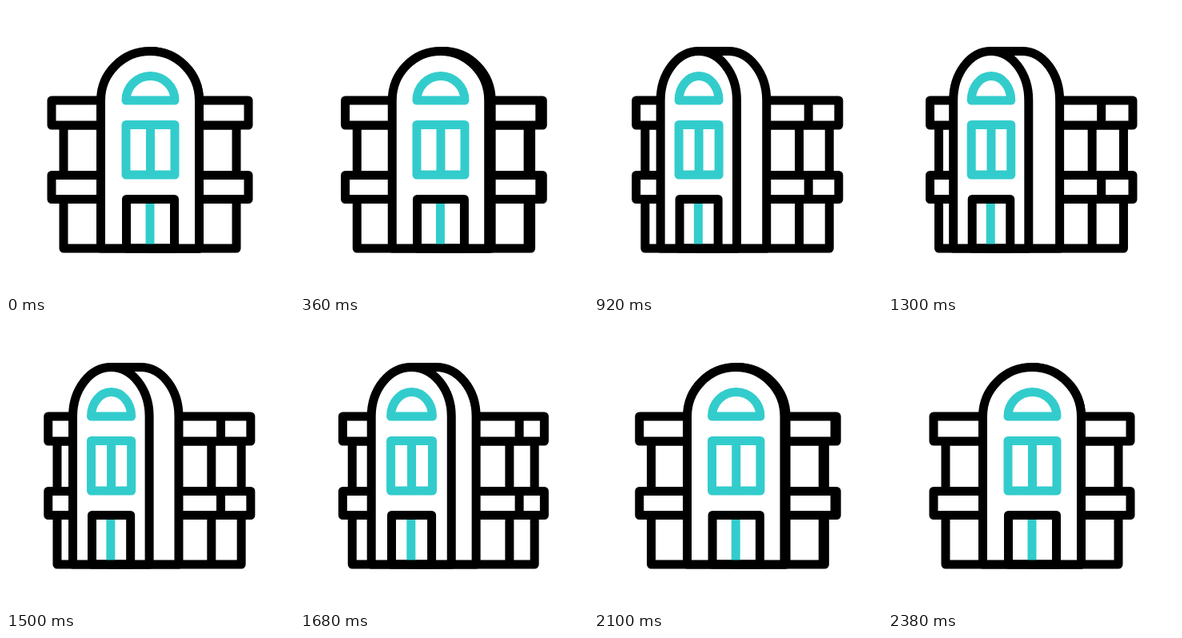
Animation of 360 by 360 pixels, one loop 2.4 s. Source, as an HTML page:

```html
<!DOCTYPE html>
<html lang="en">
<head>
<meta charset="utf-8">
<title>Turning building</title>
<style>
  html, body { margin: 0; height: 100%; overflow: hidden; background: #fff; }
  svg { display: block; width: 100vw; height: 100vh; }
  path { fill: #fff; stroke: #000; stroke-width: 11; stroke-linejoin: round; }
  .teal { stroke: #33cccc; }
</style>
</head>
<body>
<svg viewBox="0 0 360 360">
  <path id="walls"/>
  <path id="balconies"/>
  <path id="towerSide"/>
  <path id="towerFront"/>
  <path id="doorBar" class="teal"/>
  <path id="door"/>
  <path id="panes" class="teal"/>
</svg>
<script>
const LOOP = 2400;
const GROUND = 303;
const mix = (a, b, p) => a + (b - a) * p;
const draw = (id, d) => document.getElementById(id).setAttribute('d', d);
const box = (l, r, t, b) => `M${l} ${t}H${r}V${b}H${l}Z`;
const bar = (x, t, b) => `M${x} ${t}V${b}`;
const arch = (l, r, spring, top, base) =>
  `M${l} ${base}V${spring}A${(r - l) / 2} ${spring - top} 0 0 1 ${r} ${spring}V${base}Z`;

// cubic-bezier(.75, 0, .25, 1), solved by bisection
function ease(x) {
  let lo = 0, hi = 1, u = 0.5;
  for (let i = 0; i < 24; i++) {
    u = (lo + hi) / 2;
    const v = 1 - u;
    if (2.25 * u * v * v + 0.75 * u * u * v + u ** 3 < x) lo = u; else hi = u;
  }
  return u * u * (3 - 2 * u);
}

function render(time) {
  const phase = time % LOOP / (LOOP / 2);
  const p = ease(phase < 1 ? phase : 2 - phase);
  const at = (front, turned) => mix(front, turned, p);

  const wallLeft = at(72, 63.5), wallRight = at(288, 294.5);
  draw('walls', box(wallLeft, wallRight, 149, GROUND) + bar(at(288, 255), 149, GROUND));

  const balconyLeft = at(57, 52.5), balconyRight = at(303, 306);
  const balconyCorner = at(303, 266.5);
  const balcony = (t, b) => box(balconyLeft, balconyRight, t, b) + bar(balconyCorner, t, b);
  draw('balconies', balcony(118, 149) + balcony(211.5, 241.5));

  const left = at(118.5, 81.5), right = at(241.5, 175.5), backRight = at(241.5, 214.5);
  const radius = (right - left) / 2;
  draw('towerSide', `M${left + radius} 56.5H${backRight - radius}` +
    `A${radius} 61.5 0 0 1 ${backRight} 118V${GROUND}H${left + radius}Z`);
  draw('towerFront', arch(left, right, 118, 56.5, GROUND));

  const doorLeft = at(150.5, 105), doorRight = at(210.5, 152.5);
  draw('door', box(doorLeft, doorRight, 241.5, GROUND));
  document.getElementById('door').style.fill = 'none';
  draw('doorBar', bar(at(180, 128), 241.5, GROUND));

  const paneLeft = at(150, 104), paneRight = at(211, 153.5);
  draw('panes', arch(paneLeft, paneRight, 118, 87.5, 118) +
    box(paneLeft, paneRight, 148.5, 211) + bar((paneLeft + paneRight) / 2, 148.5, 211));
}

const start = performance.now();
function tick() {
  render(performance.now() - start);
  requestAnimationFrame(tick);
}
tick();
</script>
</body>
</html>
```
